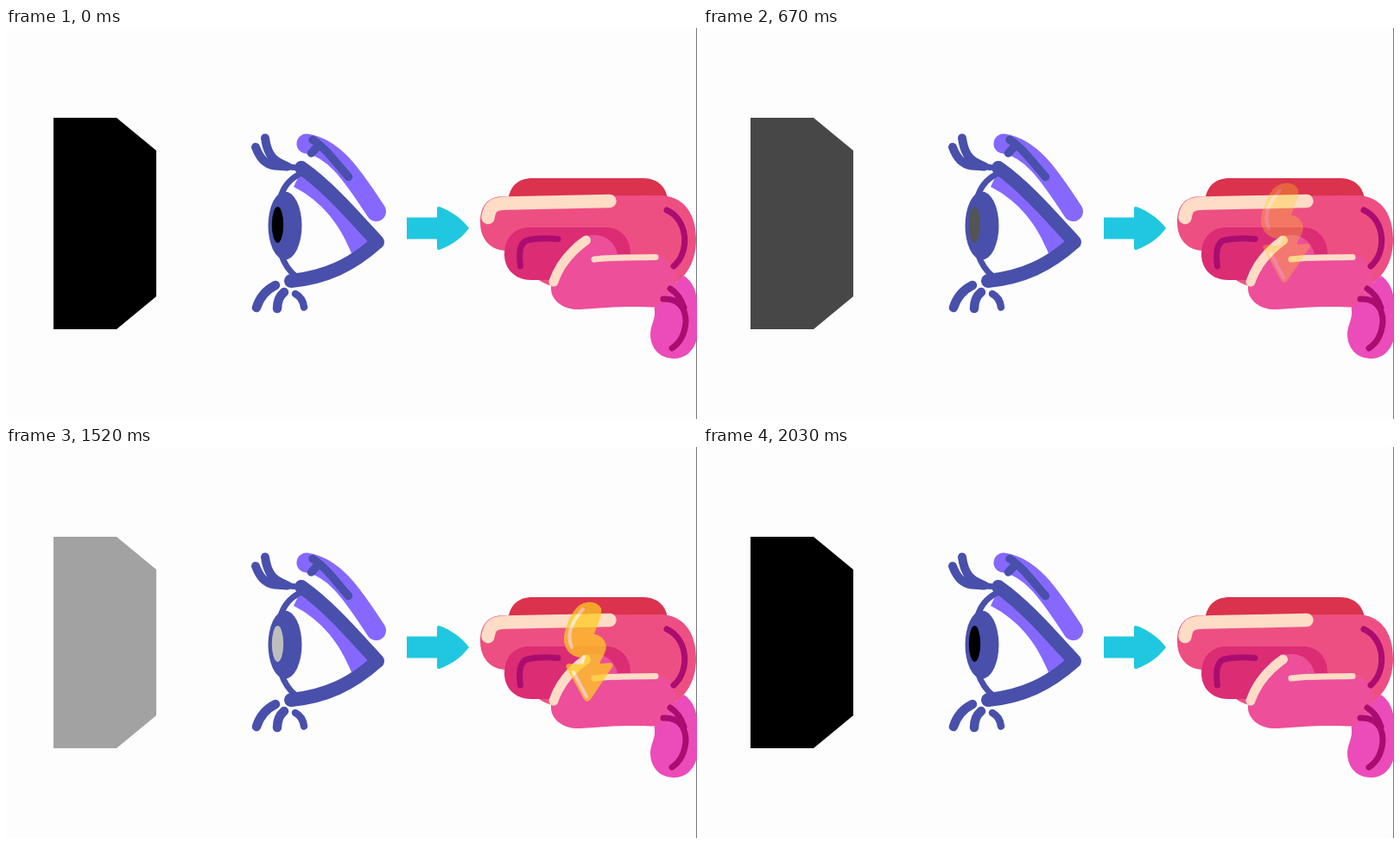
Recreate the animation shown at these times as an HTML page. Size 800 px wide and 453 px high, loop 2060 ms.

```html
<!DOCTYPE html>
<html lang="en">
<head>
<meta charset="utf-8">
<title>Light, eye and brain</title>
<style>
  html, body { margin: 0; width: 100%; height: 100%; overflow: hidden; background: #fdfdfd; }
  svg { display: block; width: 800px; height: 453px; }
  .line { fill: none; stroke-linecap: round; stroke-linejoin: round; }
</style>
</head>
<body>
<svg viewBox="0 0 800 453">
  <path d="M799.5 0V453" stroke="#777"/>
  <path id="block" d="M55 104H128L174 142V311L128 349H55Z"/>

  <g id="eye">
    <g class="line" stroke="#4850ab">
      <path stroke-width="10" d="M289 138C294 151 300 158 311 159.500Q319 160 325 160.500M300 127.500C302 142 306 150 314 154.500Q320 158 326 160.500"/>
      <path stroke-width="7" d="M318 159.500L333 161.500"/>
      <path stroke-width="10.500" d="M312 298C302 303 294 311 290 324M322 306C316 311 314 317 314 325"/>
      <path stroke-width="8.500" d="M335 308C341 311 344 316 345 323.500"/>
    </g>
    <path class="line" stroke="#8668ff" stroke-width="23" d="M348 134C379 139 399 167 428.500 212.500"/>
    <path class="line" stroke="#4850ab" stroke-width="9.500" d="M355 129.500C369 138 382 156 396.500 172.500M361 137L353.500 145"/>
    <path fill="#8668ff" d="M342 165L428 248L400 261C388 232 370 203 333 184Z"/>
    <g class="line" stroke="#4850ab">
      <path stroke-width="7" d="M340 169C329 175 321 184 318 196M318 261C322 273 328 282 336 288"/>
      <path stroke-width="16" d="M342 162C372 183 400 215 430 248C400 275 370 289 330 293"/>
    </g>
    <ellipse cx="323" cy="229" rx="19.500" ry="39.500" fill="#4850ab"/>
    <ellipse id="pupil" cx="314.500" cy="228" rx="6.700" ry="21"/>
  </g>

  <path fill="#1fc8e0" d="M464 219.500H499V209Q499 206 503 207.500C517 213 528 221 536 232C528 243 517 251 503 256.500Q499 258 499 255V244.500H464Z"/>

  <g id="brain">
    <path fill="#db324d" d="M581 200C583 184 592 174 610 174H737C754 174 765 184 766 200Z"/>
    <path fill="#ee4f83" d="M549 225C549 206 558 195 576 195L760 194C785 196 799 215 799 245C799 270 788 290 768 300H640C620 299 604 285 594 258H580C560 258 549 244 549 225Z"/>
    <path fill="#dc2c74" d="M606 231H694C712 231 723 244 723 262L700 275L632 292H608C590 292 577 280 577 262C577 243 589 231 606 231Z"/>
    <path fill="#ed4f9a" d="M631 300C633 288 645 265 657 250C672 234 702 236 708 262H748C766 263 777 278 776 294C775 312 764 324 748 323.500C715 322 692 324 665 326C645 327 630 315 631 300Z"/>
    <path fill="#ec4cb9" d="M785 287C795 294 800 305 800 320V360C796 375 786 383 773 383C757 383 746 371 746 355C746 343 753 338 750.500 323.500Q764 319 769 308Q774 294 785 287Z"/>
    <g class="line" stroke="#ab0c70" stroke-width="7">
      <path d="M595.500 276C593 258 596 247 605 245.500C615 243.500 628 243.500 639 244.500"/>
      <path d="M765 211C790 222 792 260 773 276"/>
      <path d="M761 314C779 313 787 325 787 340C786 355 780 365 771 371M769 302C777 307 782 315 785 324"/>
    </g>
    <g class="line" stroke="#ffdcc6">
      <path stroke-width="15.500" d="M558 219.500C560 206 566 203 580 203L699 200.500"/>
      <path stroke-width="11" d="M634 294C640 276 652 260 671.500 246"/>
      <path stroke-width="7" d="M681 268C705 265 730 266 752 265.500"/>
    </g>
  </g>

  <g id="bolt" opacity="0">
    <path fill="#ffcb1f" d="M660 187C668 178 684 177 689 187C691 195 684 207 681 217C691 218 697 228 694 236C692 244 687 247 688 251L700 250Q704 251 702 255L677 292Q673 298 669 292L649 256Q647 251 652 251L664 252C665 248 668 247 667 244C654 244 645 234 646 220C648 207 653 195 660 187Z"/>
    <path class="line" stroke="#fff1c4" stroke-width="4" d="M668 188C657 200 648 216 655 232M657 261L672 289M669 243L667 250"/>
  </g>
</svg>
<script>
  const LOOP = 2060, STEPS = 68, LAST = STEPS - 1;
  const [block, pupil, bolt] = ["block", "pupil", "bolt"].map(id => document.getElementById(id));
  const gray = v => `rgb(${v},${v},${v})`;

  // Brightness climbs in even steps, then drops to black on the last one.
  function draw(now) {
    const step = Math.floor((now % LOOP + 5) * STEPS / LOOP);
    const p = step >= LAST ? 0 : step / LAST;
    block.style.fill = gray(Math.round(217 * p));
    pupil.style.fill = gray(Math.round(255 * p));
    bolt.setAttribute("opacity", p);
  }

  let start;
  function tick(now) {
    start ??= now;
    draw(now - start);
    requestAnimationFrame(tick);
  }
  draw(0);
  requestAnimationFrame(tick);
</script>
</body>
</html>
```
